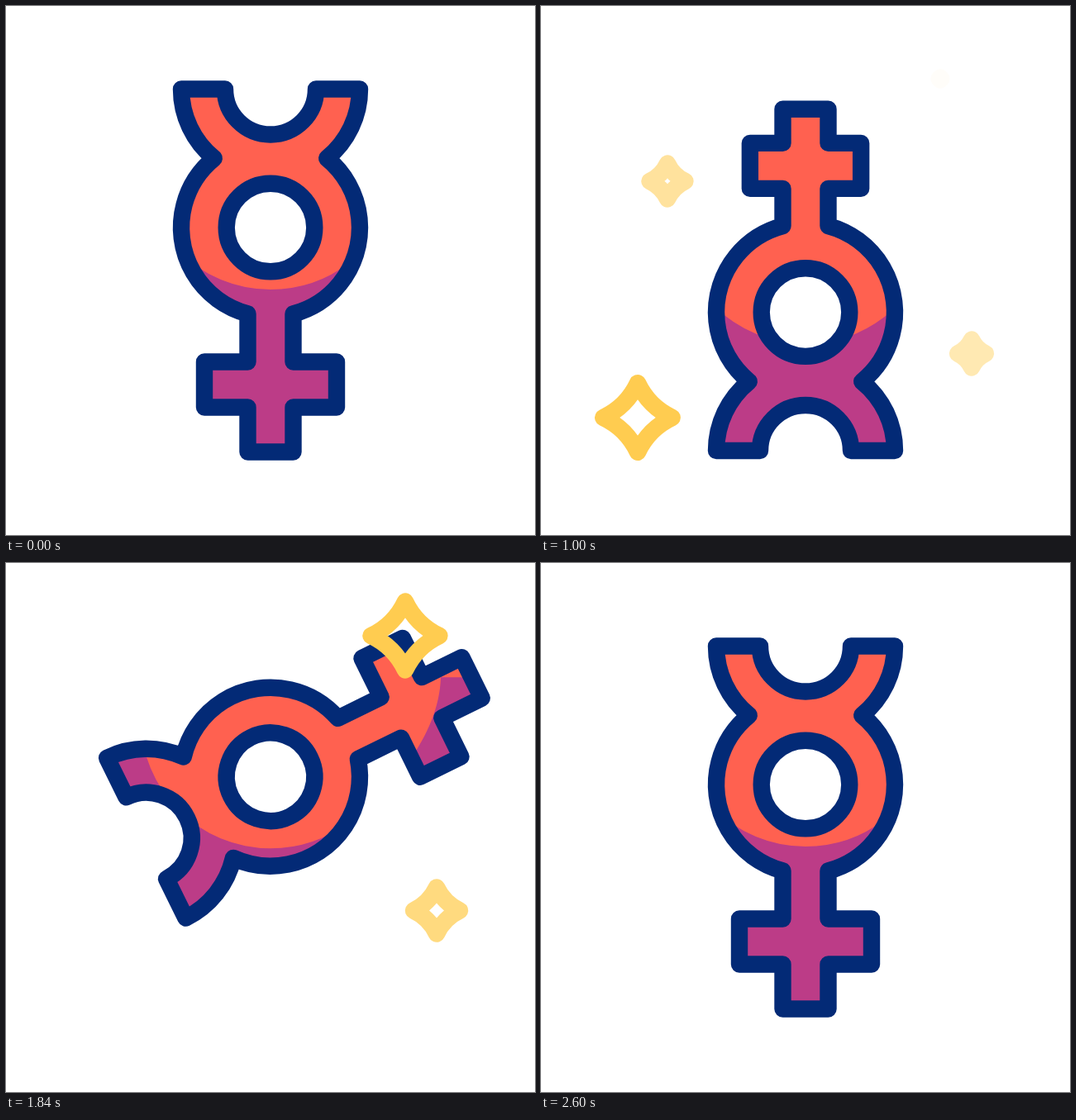
An HTML page with a canvas that plays this animation: 640x640 px, repeating every 2800 ms.

```html
<!DOCTYPE html>
<html lang="en">
<head>
<meta charset="utf-8">
<title>Mercury symbol</title>
<style>
  html, body { margin: 0; width: 100%; height: 100%; overflow: hidden; background: #fff; }
  canvas { display: block; width: 100vmin; height: 100vmin; }
</style>
</head>
<body>
<canvas id="stage" width="640" height="640"></canvas>
<script>
const ctx = document.getElementById('stage').getContext('2d');
const LOOP = 2800;
const NAVY = '#032a76', ORANGE = '#ff6150', PURPLE = '#bc3c87', YELLOW = '#ffcc50';

// Cubic ease with handles (1/3, 0) and (x2, 1)
function ease(x, x2 = 2 / 3) {
  let lo = 0, hi = 1, u = x;
  for (let i = 0; i < 24; i++) {
    u = (lo + hi) / 2;
    const at = u * (1 - u) ** 2 + 3 * u * u * (1 - u) * x2 + u ** 3;
    if (at < x) lo = u; else hi = u;
  }
  return u * u * (3 - 2 * u);
}

// Keys are [time, value, optional handle of the ease that arrives there]
function track(keys, t) {
  if (t <= keys[0][0]) return keys[0][1];
  for (let i = 1; i < keys.length; i++) {
    const [t0, v0] = keys[i - 1], [t1, v1, handle] = keys[i];
    if (t < t1) return v0 + (v1 - v0) * ease((t - t0) / (t1 - t0), handle);
  }
  return keys[keys.length - 1][1];
}

const TURN = [[200, 0], [800, Math.PI], [1600, Math.PI], [2200, 2 * Math.PI]];
const HEIGHT = [[200, 268], [800, 397, 0.05], [1200, 344.5], [1600, 344.5], [2200, 230.5, 0.05], [2600, 268]];
const SHRINK = [[800, 0], [1200, 25.5], [1600, 0]];
const SHADE = [[200, 75], [500, 5], [800, 38], [1600, 38], [1900, 92], [2200, 51], [2600, 75]];

const SPARKLES = [
  { x: 117, y: 498, start: 848, beat: 220 },
  { x: 153, y: 212, start: 900, beat: 233 },
  { x: 521, y: 420.5, start: 900, beat: 270 },
  { x: 483, y: 88, start: 967, beat: 350 }
];

// Symbol outline around the centre of its ring
function symbolPath(shrink) {
  const R = 108, top = -167.5, half = 27.5;
  const neck = Math.acos(83.75 / R);
  const stem = Math.asin(half / R);
  const near = 162.5 - shrink, far = near + 55;
  const end = 271.5 - 2 * shrink, arm = 80 - shrink;
  const path = new Path2D();
  path.moveTo(-R, top);
  path.arc(0, top, 55, Math.PI, 0, true);
  path.arc(0, top, R, 0, Math.PI / 2 - neck);
  path.arc(0, 0, R, neck - Math.PI / 2, Math.PI / 2 - stem);
  const side = [[half, near], [arm, near], [arm, far], [half, far], [half, end]];
  side.forEach(([x, y]) => path.lineTo(x, y));
  side.reverse().forEach(([x, y]) => path.lineTo(-x, y));
  path.arc(0, 0, R, Math.PI / 2 + stem, 1.5 * Math.PI - neck);
  path.arc(0, top, R, Math.PI / 2 + neck, Math.PI);
  path.closePath();
  return path;
}

const shadePath = new Path2D();
shadePath.moveTo(-600, -207);
shadePath.lineTo(-157, -207);
shadePath.arc(0, -157, 157, Math.PI, 0.921, true);
shadePath.bezierCurveTo(144, -69, 204, -135, 206, -207);
shadePath.lineTo(600, -207);
shadePath.lineTo(600, 600);
shadePath.lineTo(-600, 600);

function drawSymbol(t) {
  const turn = track(TURN, t);
  const outline = symbolPath(track(SHRINK, t));
  ctx.save();
  ctx.translate(320, track(HEIGHT, t));
  ctx.rotate(turn);

  ctx.save();
  ctx.clip(outline);
  ctx.fillStyle = ORANGE;
  ctx.fill(outline);
  ctx.rotate(-turn);
  ctx.translate(0, track(SHADE, t));
  ctx.fillStyle = PURPLE;
  ctx.fill(shadePath);
  ctx.restore();

  ctx.strokeStyle = NAVY;
  ctx.stroke(outline);
  ctx.beginPath();
  ctx.arc(0, 0, 53.3, 0, 2 * Math.PI);
  ctx.fillStyle = '#fff';
  ctx.fill();
  ctx.stroke();
  ctx.restore();
}

function drawSparkle({ x, y, start, beat }, t) {
  const phase = (t - start) / beat;
  if (phase <= 0 || phase >= 4) return;
  const size = track([[0, 0], [1, 1], [2, 0.55], [3, 1], [4, 0]], phase);
  const r = 53.7 * size, c = 0.32 * r;
  ctx.save();
  ctx.translate(x, y);
  if (phase < 1 || phase > 3) ctx.globalAlpha = Math.min(1, size * 1.4);
  ctx.beginPath();
  ctx.moveTo(r, 0);
  ctx.quadraticCurveTo(c, c, 0, r);
  ctx.quadraticCurveTo(-c, c, -r, 0);
  ctx.quadraticCurveTo(-c, -c, 0, -r);
  ctx.quadraticCurveTo(c, -c, r, 0);
  ctx.closePath();
  ctx.strokeStyle = YELLOW;
  ctx.stroke();
  ctx.restore();
}

function draw() {
  const t = performance.now() % LOOP;
  ctx.fillStyle = '#fff';
  ctx.fillRect(0, 0, 640, 640);
  ctx.lineWidth = 20.4;
  ctx.lineJoin = 'round';
  drawSymbol(t);
  SPARKLES.forEach(sparkle => drawSparkle(sparkle, t));
  requestAnimationFrame(draw);
}
draw();
</script>
</body>
</html>
```
